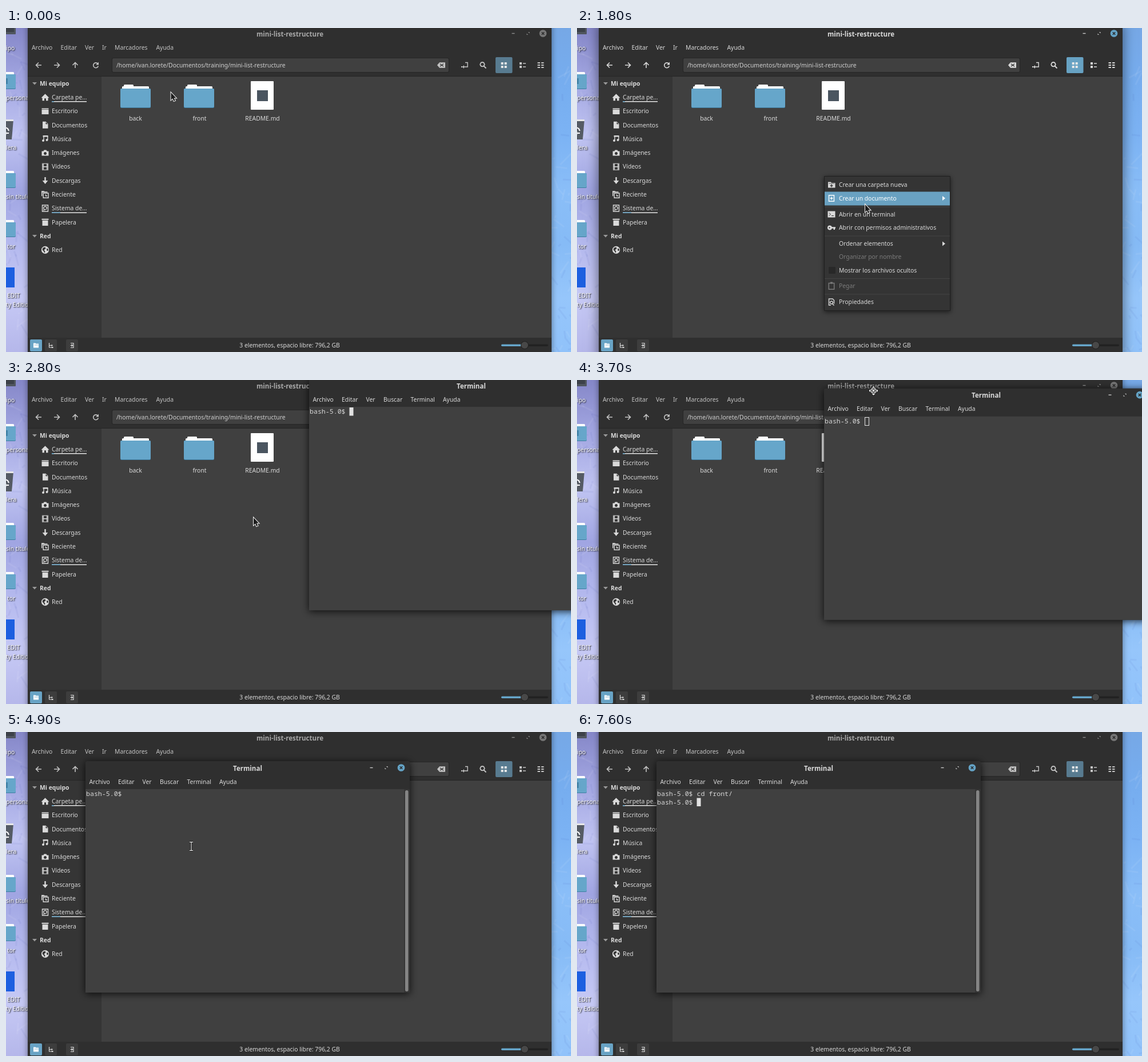
An HTML page with a canvas for the animation above (8 s loop, 988 px wide and 567 px high).

```html
<!DOCTYPE html>
<html lang="es">
<head>
<meta charset="utf-8">
<title>Terminal</title>
<style>
html, body { margin: 0; width: 100%; height: 100%; overflow: hidden; background: #333 }
canvas { display: block }
</style>
</head>
<body>
<canvas id="stage" width="988" height="567"></canvas>
<script>
const ctx = document.getElementById('stage').getContext('2d');
const SANS = '10.36px "Noto Sans", sans-serif';
const BOLD = 'bold 10.4px "Noto Sans", sans-serif';
const TITLE = 'bold 11.55px "Noto Sans", sans-serif';
const MONO = '11.58px "Noto Sans Mono", monospace';
const CHAR = 6.95;
const INK = '#dadada', BAR = '#2f2f2f', PANE = '#404040', BLUE = '#66a6ca';
const LOOP = 8000, STEP = 100;

function rect(x, y, w, h, color, r = 0) {
  ctx.fillStyle = color;
  ctx.beginPath();
  ctx.roundRect(x, y, w, h, r);
  ctx.fill();
}

function text(s, x, y, color = INK, font = SANS, align = 'left') {
  ctx.font = font;
  ctx.textAlign = align;
  ctx.fillStyle = color;
  ctx.fillText(s, x, y + (font === MONO ? 4 : 3.8));
}

// Fills and strokes path data around (x, y).
function icon(x, y, fill, stroke = '', color = INK, width = 1.4) {
  ctx.save();
  ctx.translate(x, y);
  ctx.fillStyle = ctx.strokeStyle = color;
  ctx.lineWidth = width;
  if (fill) ctx.fill(new Path2D(fill), 'evenodd');
  if (stroke) ctx.stroke(new Path2D(stroke));
  ctx.restore();
}

function withShadow(blur, alpha, draw) {
  ctx.save();
  ctx.shadowColor = `rgba(0,0,0,${alpha})`;
  ctx.shadowBlur = blur;
  ctx.shadowOffsetY = 2;
  draw();
  ctx.restore();
}

// Linear motion through [time, x, y] keys.
function along(keys, t) {
  let i = keys.findIndex(k => k[0] > t);
  if (i < 0) return keys.at(-1).slice(1);
  if (i === 0) return keys[0].slice(1);
  const [t0, x0, y0] = keys[i - 1], [t1, x1, y1] = keys[i];
  const p = (t - t0) / (t1 - t0);
  return [x0 + (x1 - x0) * p, y0 + (y1 - y0) * p];
}

function strip(x, w, colors) {
  const g = ctx.createLinearGradient(0, 0, 0, 567);
  colors.forEach((c, i) => g.addColorStop(i / (colors.length - 1), c));
  rect(x, 0, w, 567, g);
}

function wallpaper() {
  strip(0, 60, ['#8587c8', '#a3a7e2', '#c0c4f2', '#a0a5e2', '#b4b9ee', '#c6c9f5', '#b5b7ea']);
  strip(930, 58, ['#76a8e6', '#76adef', '#7cb3f4', '#8abef8', '#86bbf6', '#96c6fb', '#90c2fa']);
  let seed = 7;
  const rnd = () => (seed = seed * 16807 % 2147483647) / 2147483647;
  ctx.lineWidth = 3;
  for (let i = 0; i < 90; i++) {
    const x = (i % 2 ? 950 : -5) + rnd() * 38, y = rnd() * 567;
    ctx.strokeStyle = rnd() < .5 ? 'rgba(255,255,255,.07)' : 'rgba(50,70,170,.06)';
    ctx.beginPath();
    ctx.moveTo(x, y);
    ctx.lineTo(x + rnd() * 30 - 8, y + rnd() * 44 - 22);
    ctx.stroke();
  }
}

function folder(x, y, w = 53, h = 41) {
  rect(x + 6, y, 17, 8, '#fff', 1.5);
  rect(x + 3, y + 3, w - 6, 12, '#fff', 1.5);
  rect(x, y + 7, w, h - 7, '#3f7ea2', 2);
  rect(x, y + 7, w, h - 8, BLUE, 2);
}

function desktop() {
  wallpaper();
  rect(-5, -4, 22, 15, '#50565f', 1);
  rect(-5, -4, 19, 11, '#3c4149');
  [76, 249, 335].forEach(y => folder(-27, y - 2, 44, 33));
  rect(0, 88, 3, 10, '#4584a8');
  icon(0, 160, 'M0 0H13L10 35H0Z', '', '#555b64');
  icon(0, 160, 'M0 0H13V3H0Z', '', '#e8e8e8');
  icon(1, 179, '', 'M-2-5L2-3 4 1M4 5H-1M-1 2L-3 5 -1 8', '#fff', 2);
  rect(-20, 419, 35, 35, '#1d5fe0');
  ctx.save();
  ctx.shadowColor = '#000';
  ctx.shadowBlur = 2;
  ctx.shadowOffsetX = ctx.shadowOffsetY = 1;
  [['ipo', 0, 35], ['persona', 0, 122], ['lera', 0, 209], ['sin título', 0, 295],
   ['tor', 2, 382], ['EDIT', 2, 468], ['ty Editio', 0, 484]]
    .forEach(([s, x, y]) => text(s, x, y, '#fff'));
  ctx.restore();
}

function controls(x, y, active) {
  const c = active ? '#c8c8c8' : '#8d8d8d';
  icon(x, y, '', 'M-2.5 0H2.5', c);
  icon(x + 26, y, 'M0-2.5H2.5V0ZM-2.5 0V2.5H0Z', '', c);
  icon(x + 52, y, 'M0-6.3A6.3 6.3 0 1 1-.01-6.3Z', '', active ? '#64a3c6' : '#777');
  icon(x + 52, y, '', 'M-2.2-2.2L2.2 2.2M2.2-2.2L-2.2 2.2', '#2b2b2b', 1.5);
}

const PLACES = [
  ['Mi equipo'],
  ['Carpeta pe...', 'M-7 1L0-6 7 1H5V6H1.5V2H-1.5V6H-5V1Z'],
  ['Escritorio', 'M-6-5H6V-3.4H-6ZM-6-2.6H6V5.4H-6Z'],
  ['Documentos', 'M-4.5-6H1L5-2V6H-4.5ZM1-5V-1.6H4.4Z'],
  ['Música', 'M-4-6H5V-3.5H-4ZM-5.5 3A2 2 0 1 1-1.5 3A2 2 0 1 1-5.5 3ZM1 2A2 2 0 1 1 5 2A2 2 0 1 1 1 2Z', 'M-2.5 3V-5M4.3 2V-5'],
  ['Imágenes', 'M-6-3H-3L-2-5H2L3-3H6V5H-6ZM0-1.5A2.5 2.5 0 1 0 .01-1.5Z'],
  ['Vídeos', 'M-5.5-6H5.5V6H-5.5ZM-2.5-5H2.5V-.7H-2.5ZM-2.5.7H2.5V5H-2.5Z'
    + [-4.5, -1.5, 1.5, 4].map(y => `M-4.7 ${y - .7}h1v1.4h-1ZM3.7 ${y - .7}h1v1.4h-1Z`).join('')],
  ['Descargas', 'M-1.2-6H1.2V0H4.8L0 6 -4.8 0H-1.2Z'],
  ['Reciente', 'M-6.5-6H-2L-1-5H4V-3.5H-5V3H-6.5Z', 'M-3.3-2.3H5.5V6H-3.3ZM1 0V2.5H3.5'],
  ['Sistema de...', '', 'M-5-5.5H5V5.5H-5ZM0-3.2A2.8 2.8 0 1 1-.01-3.2ZM-3 4L-1 1.5'],
  ['Papelera', 'M-6-6H6V-4H-6ZM-5-3H5V6.3H-5Z'],
  ['Red'],
  ['Red', 'M0-6.6A6.6 6.6 0 1 1-.01-6.6ZM-4-3.5L0-5 1-2 -2 0 0 3 -1 5.5 -3 2 -5 0ZM3-3L5.5-1 5 2 2.5 1Z'],
];

function sidebar() {
  rect(38, 85, 129, 457, '#353535');
  PLACES.forEach(([name, fill, stroke], i) => {
    const y = 97 + 24.28 * i;
    if (fill === undefined) {
      icon(50, y, 'M-4-2H4L0 2.5Z', '', '#999');
      text(name, 59, y, INK, BOLD);
    } else {
      icon(68.5, y, fill, stroke);
      text(name, 80, y);
    }
  });
  [[128, 4], [322.4, 15]].forEach(([y, used]) => {
    rect(80, y, 61, 1.5, '#e4e4e4');
    rect(80, y, used, 1.5, BLUE);
  });
}

function toolbar(c, active) {
  icon(57, 65, '', 'M5 0H-4M0-4.5L-4.5 0 0 4.5', c, 1.6);
  icon(89, 65, '', 'M-5 0H4M0-4.5L4.5 0 0 4.5', c, 1.6);
  icon(121, 65, '', 'M0 5V-4M-4.5 0L0-4.5 4.5 0', c, 1.6);
  icon(157, 65, 'M5-5.5V-.5H0Z', 'M3.5-2.5A4.4 4.4 0 1 0 4.3 1.5', c, 1.6);
  rect(185, 52, 590, 26, '#262626', 3);
  rect(186, 53, 588, 24, PANE, 2);
  text('/home/ivan.lorete/Documentos/training/mini-list-restructure', 193, 65, '#cfcfcf');
  icon(761, 65, 'M-7 0L-3-4.8H7V4.8H-3ZM-1.8-2.8L-2.6-2 -.4 0 -2.6 2 -1.8 2.8 1 .9 3.8 2.8 4.6 2 2.4 0 4.6-2 3.8-2.8 1-.9Z', '', c);
  icon(802, 65, 'M-1 0V6L-4 3ZM-6 2H-4V4H-6Z', 'M1-4.5H5.2V3H-2', c);
  icon(834, 65, '', 'M-1-5A3.7 3.7 0 1 1-1.01-5ZM1.5 1.5L5.5 5.5', c, 1.8);
  rect(856, 51, 29.5, 28, active ? '#67a2c3' : '#587b90', 2);
  const cell = (x, y, w = 4) => `M${x} ${y}h${w}v4h${-w}Z`;
  icon(870.7, 65, cell(-5, -5) + cell(1, -5) + cell(-5, 1) + cell(1, 1), '', '#e8e8e8');
  icon(903, 65, cell(-5, -5) + cell(-5, 1), 'M1-3H6M1 3H6', c);
  icon(935, 65, '', 'M-5.5-4H-1M-5.5 0H-1M-5.5 4H-1M1-4H5.5M1 0H5.5M1 4H5.5', c, 1.8);
}

function statusBar(status) {
  rect(38, 542, 916, 25, BAR);
  rect(42, 545, 21, 21, '#68a3c5', 2);
  icon(52.5, 555.5, 'M-4.5-4H-1L0-3H4.5V4H-4.5ZM-3-1H4V-.2H-3Z', '', '#fff');
  rect(68, 545, 21, 21, '#3d3d3d', 2);
  icon(78.5, 555.5, 'M0-1H3V1H0ZM1 2.5H4V4.5H1Z', 'M-3-4.5V3.5H1M-3 0H0', INK, 1.2);
  rect(105, 545, 21, 21, '#3d3d3d', 2);
  icon(115.5, 555.5, '', 'M-2.5-4H2.5V4H-2.5M-3 0H1M-1-2L1 0 -1 2', INK, 1.2);
  text(status, 496, 555, INK, SANS, 'center');
  rect(866, 553.5, 82, 3.5, '#222', 2);
  rect(866, 553.5, 38, 3.5, BLUE, 2);
  rect(900, 548, 14, 14, '#222', 7);
  rect(901, 549, 12, 12, '#484848', 6);
}

function menuBar(items, y, color) {
  items.forEach(([s, x]) => text(s, x, y, color));
}

function fileManager(active, status) {
  withShadow(active ? 20 : 10, active ? .55 : .45, () => rect(38, -10, 916, 590, BAR));
  const c = active ? INK : '#c4c4c4';
  text('mini-list-restructure', 496.5, 11, active ? INK : '#a8a8a8', TITLE, 'center');
  controls(887, 9.5, active);
  menuBar([['Archivo', 45], ['Editar', 95.5], ['Ver', 138], ['Ir', 168], ['Marcadores', 190], ['Ayuda', 262.5]], 34, c);
  toolbar(c, active);
  rect(167, 85, 787, 457, PANE);
  rect(38, 84, 916, 1, '#262626');
  sidebar();
  folder(200, 99);
  folder(311, 99);
  rect(428, 93, 40, 50, '#fff', 1);
  rect(439, 109, 19, 19, '#4a5560');
  [['back', 226.5], ['front', 338.5], ['README.md', 448.5]]
    .forEach(([s, x]) => text(s, x, 158.5, INK, SANS, 'center'));
  statusBar(status);
}

const MENU = [
  ['Crear una carpeta nueva', 274.5, 'M-6-5H-1L0-3.5H6.5V5H-6ZM-5-2.7H5.5V-2H-5ZM-.6-1H.8V.8H2.6V2.2H.8V4H-.6V2.2H-2.4V.8H-.6Z'],
  ['Crear un documento', 298, '', 'M-4.5-5.3H4.5V5.3H-4.5ZM0-2.5V2.5M-2.5 0H2.5'],
  ['Abrir en un terminal', 325.5, 'M-6.5-5.5H6.5V5.5H-6.5ZM-4.5-2.5L-2 0 -4.5 2.5 -4 3 -1 0 -4-3ZM0 2H4V3H0Z'],
  ['Abrir con permisos administrativos', 349, 'M-3-4A4 4 0 0 1 .8-1.2H7V1.2H6V3.5H3.5V1.2H.8A4 4 0 1 1-3-4ZM-3.5-1.2A1.2 1.2 0 1 0-3.49-1.2Z'],
  ['Ordenar elementos', 377],
  ['Organizar por nombre', 400],
  ['Mostrar los archivos ocultos', 423.5],
  ['Pegar', 451, 'M-2-7H2V-4H-2Z', 'M-4.7-5H4.7V5.7H-4.7Z'],
  ['Propiedades', 479, '', 'M-1 5.5H-4.5V-5.5H2L4.5-3V3M0-1.5A2.4 2.4 0 1 1-.01-1.5ZM1.5 3L4.5 6'],
];

function contextMenu(hover, alpha) {
  const grow = hover > 0 ? .5 : 0;
  ctx.globalAlpha = alpha;
  withShadow(8, .6, () => rect(432, 259, 221, 235.5 + grow, '#1f1f1f', 1));
  rect(433, 260, 219, 233.5 + grow, '#343434');
  [312, 363, 437.5, 465].forEach(y => rect(433, y + grow, 219, 1, '#444'));
  MENU.forEach(([label, y0, fill, stroke], i) => {
    const y = y0 + (i > 1 ? grow : 0);
    const on = i === hover;
    if (on) rect(433, y - 11.5, 219, 24, '#69a1c1');
    const c = on ? '#fff' : i === 5 || i === 7 ? '#7b7b7b' : INK;
    text(label, 458, y, c);
    if (fill || stroke) icon(445, y, fill, stroke, c);
    if (i === 1 || i === 4) icon(641, y, 'M-2-4L3 0 -2 4Z', '', c);
    if (i === 6) rect(440, y - 6, 12, 12, '#282828', 1);
  });
  ctx.globalAlpha = 1;
}

const TYPED = [[5200, 'c'], [5300, 'cd'], [5500, 'cd '], [6000, 'cd f'], [6200, 'cd fr'], [6400, 'cd fro'], [6600, 'cd front/']];

function terminal(x, y, t) {
  withShadow(14, .8, () => rect(x, y, 567, 405, BAR, [3, 3, 0, 0]));
  text('Terminal', x + 283.5, y + 13, INK, TITLE, 'center');
  controls(x + 500, y + 11.5, true);
  menuBar([['Archivo', x + 6.5], ['Editar', x + 57], ['Ver', x + 99.5], ['Buscar', x + 130], ['Terminal', x + 177.5], ['Ayuda', x + 234]], y + 36, INK);
  rect(x, y + 49, 567, 356, PANE);
  rect(x + 557, y + 49, 10, 356, '#363636');
  rect(x + 559, y + 51, 5.5, 352, '#858585', 3);

  const prompt = 'bash-5.0$ ';
  const typed = TYPED.findLast(k => k[0] <= t)?.[1] ?? '';
  const done = t >= 7600;
  text(prompt + typed, x + 1, y + 57, '#d6d6d6', MONO);
  if (done) text(prompt, x + 1, y + 72, '#d6d6d6', MONO);

  const blank = t >= 4900 && t < 5100 || t >= 7100 && !done;
  if (blank) return;
  const bx = x + 1 + (prompt.length + (done ? 0 : typed.length)) * CHAR;
  const by = y + (done ? 64.5 : 50);
  if (t >= 3600 && t < 4200) {
    ctx.strokeStyle = '#e2e2e2';
    ctx.lineWidth = 1;
    ctx.strokeRect(Math.round(bx) + .5, Math.round(by) + .5, 7, 14);
  } else rect(bx, by, 7, 14.5, '#e2e2e2');
}

const MOUSE = [[100, 288, 112], [1000, 431, 258], [1200, 431, 258], [1800, 503.5, 308], [2000, 508, 322],
  [2700, 508, 322], [2800, 432.5, 240], [3600, 616.5, 2]];
const RELEASE = [[4100, 225.5, 55], [4400, 324.5, 202], [4500, 324.5, 202], [4600, 324, 200]];
const WINDOW = [[3600, 530, -2], [3900, 236, 48], [4000, 139, 51]];

function pointer(t, [mx, my], [wx, wy]) {
  const outlined = (x, y, d, fill, edge) => {
    icon(x, y, '', d, edge, 2);
    icon(x, y, d, '', fill);
  };
  if (t >= 5200) return;
  if (t >= 4400) {
    const [x, y] = along(RELEASE, t), beam = 'M-3-7.3H3M-3 7.3H3M0-7V7';
    icon(x, y, '', beam, '#111', 3);
    icon(x, y, '', beam, '#eee', 1.2);
  } else if (t >= 3600 && t < 4200) {
    const x = wx + 86.5, y = wy + 4;
    outlined(x, y, 'M0-8L8 0 0 8 -8 0Z', '#fff', '#222');
    icon(x, y, '', 'M-4.5-4.5H4.5V4.5H-4.5ZM0-2.5A2.5 2.5 0 1 1-.01-2.5Z', '#222', 1.3);
  } else {
    const [x, y] = t >= 4200 ? along(RELEASE, t) : [mx, my];
    outlined(x + .5, y + 1, 'M0 0V13L3 10.3 5 15 7.3 14 5.2 9.5H9Z', '#1c1c1c', '#f2f2f2');
  }
}

const TIPS = { 0: 'Crear una carpeta vacía dentro de esta carpeta', 2: 'Abrir un terminal en la carpeta en curso' };

function render(t) {
  const mouse = along(MOUSE, t), win = along(WINDOW, t);
  const menuOpen = t >= 1200 && t < 2300;
  const hover = menuOpen ? [[263, 286], [286, 311], [314, 337]].findIndex(([a, b]) => mouse[1] >= a && mouse[1] < b) : -1;
  const status = t < 2200 && TIPS[hover] || '3 elementos, espacio libre: 796,2 GB';
  desktop();
  fileManager(t >= 1000 && t < 2800, status);
  if (menuOpen) contextMenu(hover, t < 2200 ? 1 : .5);
  if (t >= 2800) terminal(...win, t);
  pointer(t, mouse, win);
}

const start = performance.now();
function tick() {
  const t = (performance.now() - start) % LOOP;
  render(Math.floor(t / STEP) * STEP);
  requestAnimationFrame(tick);
}
tick();
</script>
</body>
</html>
```
